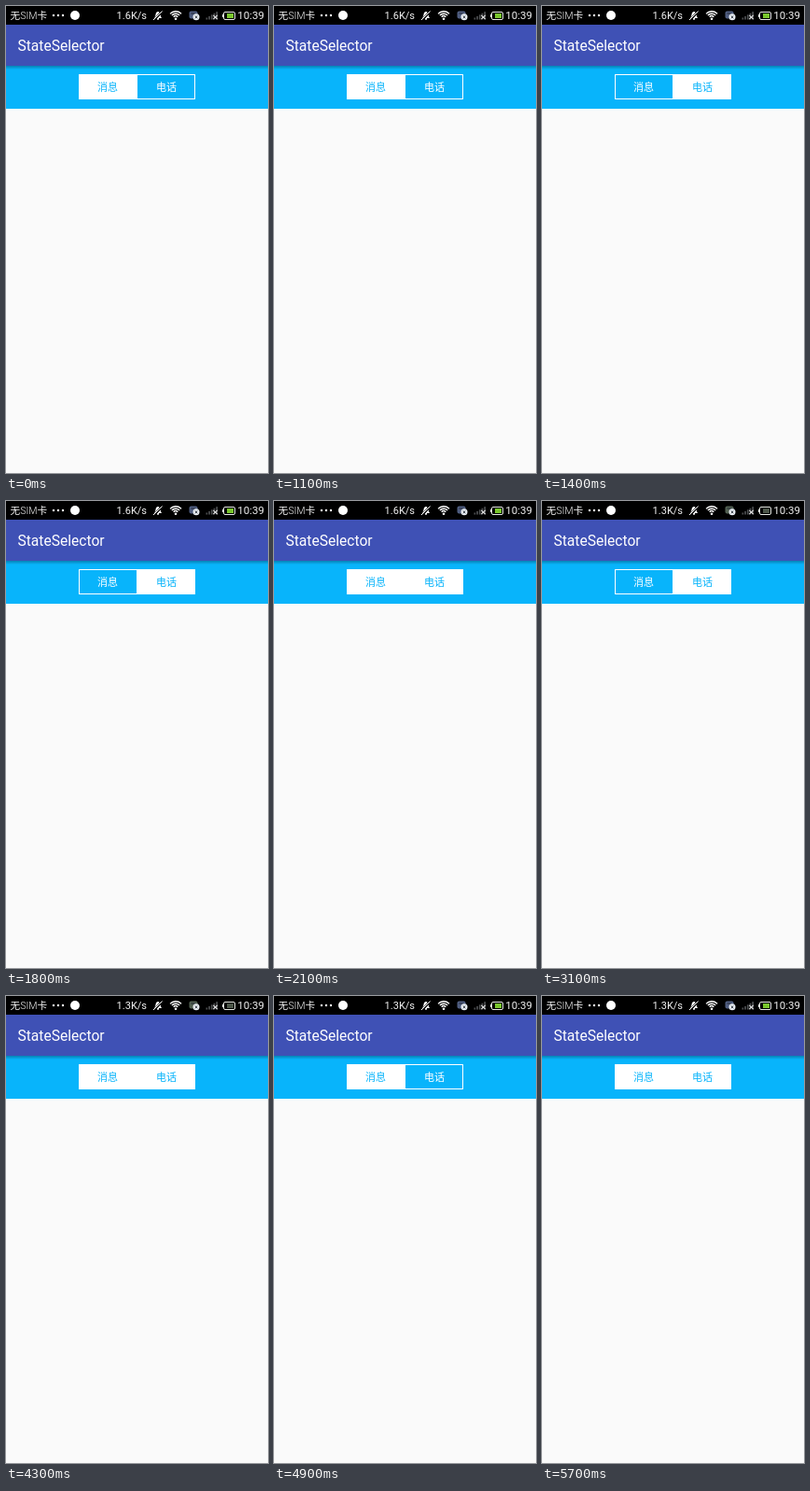
Animation of 281x500 px, one loop 6 s. Source, as an HTML page with a canvas:

```html
<!DOCTYPE html>
<html lang="zh">
<head>
<meta charset="utf-8">
<style>
  html, body { margin: 0; width: 100%; height: 100%; overflow: hidden; background: #fafafa; }
  canvas { display: block; width: 281px; height: 500px; }
</style>
</head>
<body>
<canvas id="stage" width="281" height="500"></canvas>
<script>
const ctx = document.getElementById('stage').getContext('2d');
const LOOP = 6000;
const CYAN = '#08b4fb';
const UI_FONT = 'Roboto, "Noto Sans CJK SC", "Noto Sans CJK", sans-serif';

// Each entry: start time, left tab filled, right tab filled.
const TABS = [
  [0, true, false], [1300, true, true], [1400, false, true],
  [2100, true, true], [2200, true, false], [3000, true, true],
  [3100, false, true], [4300, true, true], [4400, true, false],
  [5700, true, true]
];

function rect(x, y, w, h, color) {
  ctx.fillStyle = color;
  ctx.fillRect(x, y, w, h);
}

function dot(x, y, r, color) {
  ctx.fillStyle = color;
  ctx.beginPath();
  ctx.arc(x, y, r, 0, Math.PI * 2);
  ctx.fill();
}

function line(points, color, width) {
  ctx.strokeStyle = color;
  ctx.lineWidth = width;
  ctx.beginPath();
  points.forEach(([x, y], i) => i ? ctx.lineTo(x, y) : ctx.moveTo(x, y));
  ctx.stroke();
}

function cross(x, y, r, color, width) {
  line([[x - r, y - r], [x + r, y + r]], color, width);
  line([[x + r, y - r], [x - r, y + r]], color, width);
}

function label(text, x, y, size, color, align = 'left', weight = 400) {
  ctx.font = `${weight} ${size}px ${UI_FONT}`;
  ctx.textAlign = align;
  ctx.fillStyle = color;
  ctx.fillText(text, x, y);
}

function mutedBell(x, y) {
  ctx.fillStyle = '#fff';
  ctx.beginPath();
  ctx.moveTo(x - 4, y + 3);
  ctx.quadraticCurveTo(x - 2.5, y + 1, x - 2.5, y - 1);
  ctx.bezierCurveTo(x - 2, y - 5, x + 2, y - 5, x + 2.5, y - 1);
  ctx.quadraticCurveTo(x + 2.5, y + 1, x + 4, y + 3);
  ctx.fill();
  dot(x, y + 3.8, 1.1, '#fff');
  line([[x - 4, y + 5], [x + 5, y - 5]], '#000', 2.4);
  line([[x - 5, y + 5], [x + 4.5, y - 4.5]], '#fff', 1);
}

function wifi(x, y) {
  ctx.strokeStyle = '#fff';
  ctx.lineWidth = 1.4;
  for (const r of [3.2, 5.7, 8.2]) {
    ctx.beginPath();
    ctx.arc(x, y, r, -Math.PI * 0.76, -Math.PI * 0.24);
    ctx.stroke();
  }
  dot(x, y - 0.3, 1.3, '#fff');
}

function syncBadge(x, y, tint) {
  ctx.fillStyle = tint;
  ctx.beginPath();
  ctx.roundRect(x - 5.5, y - 4.5, 9, 8, 2);
  ctx.fill();
  rect(x - 3.5, y - 2.5, 5, 1, '#222834');
  dot(x + 2, y + 1.8, 3.5, '#e8edf2');
  cross(x + 2, y + 1.8, 1.3, '#303842', 1);
}

function signal(x, bottom) {
  for (let i = 0; i < 5; i++) {
    const h = 2 + i * 1.6;
    rect(x + i * 2.7, bottom - h, 1.7, h, '#4c4e50');
  }
  cross(x + 10, bottom - 2.5, 2.2, '#e4e4e4', 1.1);
}

function battery(x, y, fill) {
  ctx.strokeStyle = '#e6e9e3';
  ctx.lineWidth = 1;
  ctx.beginPath();
  ctx.roundRect(x + 1.5, y + 0.5, 12, 8, 1.5);
  ctx.stroke();
  rect(x, y + 3, 1.5, 3, '#e6e9e3');
  rect(x + 5, y + 2, 7, 5, fill);
}

function statusBar(t) {
  const dim = t >= 2800 && t < 4900;
  rect(0, 0, 281, 20, '#000');
  label('无SIM卡', 4.5, 13.5, 10.7, '#f4f4f4', 'left', 300);
  [51, 56, 61].forEach(x => dot(x, 10, 1.2, '#fff'));
  dot(74, 10, 5, '#fff');
  label(t < 2800 ? '1.6K/s' : '1.3K/s', 151, 14, 11, '#f4f4f4', 'right');
  mutedBell(163, 10);
  wifi(182, 14);
  syncBadge(202, 10, dim ? '#526052' : '#4f5d80');
  signal(214.5, 14.5);
  battery(232, 6, dim ? '#4b5548' : '#79c62c');
  label('10:39', 277, 14.3, 11.5, '#f4f4f4', 'right');
}

function tab(x, w, text, center, filled) {
  if (filled) rect(x, 73, w, 27, '#fff');
  label(text, center, 91, 11, filled ? CYAN : '#fff', 'center');
}

function selector(t) {
  const [, left, right] = TABS.findLast(([start]) => t >= start);
  rect(0, 64, 281, 46, CYAN);
  ctx.strokeStyle = '#fff';
  ctx.lineWidth = 1;
  ctx.strokeRect(78.5, 73.5, 124, 26);
  tab(78, 63, '消息', 109, left);
  tab(140, 63, '电话', 172, right);
}

function draw(t) {
  rect(0, 0, 281, 500, '#fafafa');
  selector(t);
  const shadow = ctx.createLinearGradient(0, 64, 0, 68);
  shadow.addColorStop(0, 'rgba(0,0,0,.28)');
  shadow.addColorStop(1, 'rgba(0,0,0,0)');
  rect(0, 64, 281, 4, shadow);
  rect(0, 20, 281, 44, '#3f51b5');
  label('StateSelector', 12.5, 48, 15.6, '#fff');
  statusBar(t);
}

function frame() {
  draw(performance.now() % LOOP);
  requestAnimationFrame(frame);
}
frame();
</script>
</body>
</html>
```
